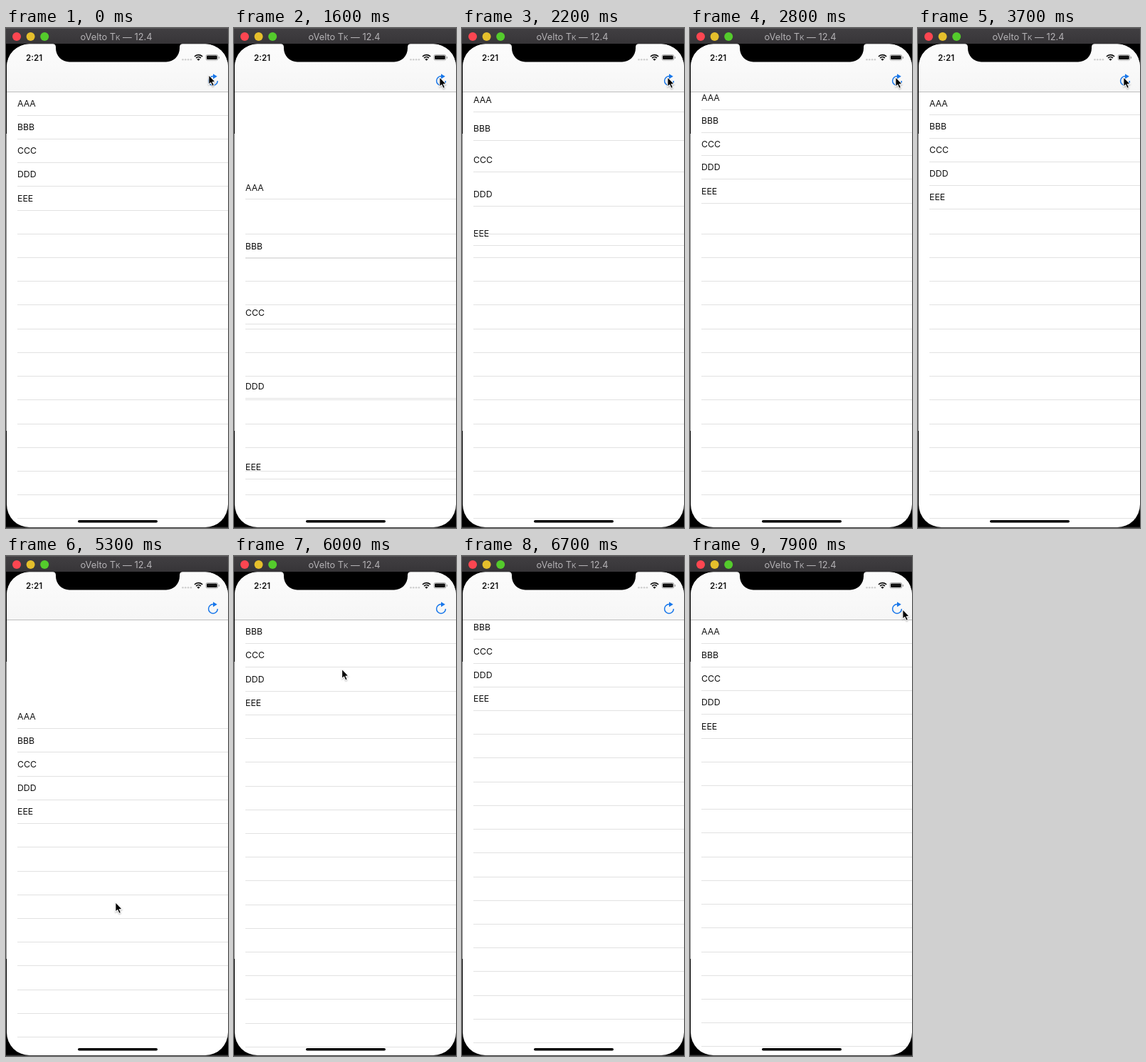
Recreate the animation shown at these times as an HTML page with a canvas. Size 312 by 700 pixels, loop 8 s.

```html
<!DOCTYPE html>
<html lang="en">
<head>
<meta charset="utf-8">
<title>List animation</title>
<style>
html, body { margin: 0; width: 100%; height: 100%; overflow: hidden; background: #000; }
canvas { display: block; width: 312px; height: 700px; }
</style>
</head>
<body>
<canvas id="stage"></canvas>
<script>
const W = 312, H = 700, LOOP = 8000;
const canvas = document.getElementById('stage');
const ctx = canvas.getContext('2d');
const dpr = window.devicePixelRatio || 1;
canvas.width = W * dpr;
canvas.height = H * dpr;

const FONT = 'Inter, Roboto, "Liberation Sans", sans-serif';
const NAMES = ['AAA', 'BBB', 'CCC', 'DDD', 'EEE'];
const TOP = 89, ROW = 33.22, SCREEN = 676;

// Reload: every row springs up from below, each a little later.
const RELOAD = 750, STAGGER = 100, OMEGA = 3.02, DAMPING = 0.8;
// Drag: the list follows the pointer, then bounces back.
const GRAB = 4850, RELEASE = 6400, GRAB_Y = 221, BOUNCE = 7.4;

// time, x, y
const PATH = [
  [100, 289, 69], [3750, 289, 69], [4450, 154, GRAB_Y], [GRAB, 154, GRAB_Y],
  [5300, 154, 485], [5400, 155, 489], [RELEASE, 150, -20],
  [7050, 300, -20], [7450, 296, 73], [7800, 299, 75], [LOOP, 299, 75]
];

function pointer(t) {
  if (t < 100) return [285, 66];
  const i = PATH.findIndex(p => p[0] > t);
  const [t0, x0, y0] = PATH[i - 1], [t1, x1, y1] = PATH[i];
  const u = (t - t0) / (t1 - t0), e = u * u * (3 - 2 * u);
  return [x0 + (x1 - x0) * e, y0 + (y1 - y0) * e];
}

function spring(sec) {
  if (sec <= 0) return 1;
  const s = sec * OMEGA, k = Math.sqrt(1 - DAMPING * DAMPING);
  return Math.exp(-DAMPING * s) * (Math.cos(k * s) + DAMPING / k * Math.sin(k * s));
}

function rubber(d) {
  return Math.sign(d) * SCREEN * (1 - 1 / (Math.abs(d) * 0.55 / SCREEN + 1));
}

function scroll(t) {
  if (t < GRAB) return 0;
  if (t < RELEASE) return rubber(pointer(t)[1] - GRAB_Y);
  const s = (t - RELEASE) / 1000 * BOUNCE;
  return rubber(pointer(RELEASE)[1] - GRAB_Y) * (1 + s) * Math.exp(-s);
}

function rowShift(i, t) {
  if (t < RELOAD || t >= GRAB) return 0;
  return SCREEN * spring((t - RELOAD - i * STAGGER) / 1000);
}

function rect(x, y, w, h, color) {
  ctx.fillStyle = color;
  ctx.fillRect(x, y, w, h);
}

function round(x, y, w, h, r, color) {
  ctx.beginPath();
  ctx.roundRect(x, y, w, h, r);
  ctx.fillStyle = color;
  ctx.fill();
}

function disc(x, y, r, color) {
  ctx.beginPath();
  ctx.arc(x, y, r, 0, Math.PI * 2);
  ctx.fillStyle = color;
  ctx.fill();
}

function poly(points, color) {
  ctx.beginPath();
  points.forEach(([x, y]) => ctx.lineTo(x, y));
  ctx.closePath();
  ctx.fillStyle = color;
  ctx.fill();
}

function text(str, x, y, size, color, weight = 400) {
  ctx.font = `${weight} ${size}px ${FONT}`;
  ctx.fillStyle = color;
  ctx.fillText(str, x, y);
  return x + ctx.measureText(str).width;
}

function list(t) {
  const shift = scroll(t);
  for (let i = 0; i < 24; i++) {
    const y = TOP + i * ROW + shift + (i < NAMES.length ? rowShift(i, t) : 0);
    if (y > H) continue;
    if (i < NAMES.length) text(NAMES[i], 16, y + 20.8, 12.3, '#111');
    rect(16, Math.round(y + ROW - 0.5), W - 16, 1, '#e2e2e2');
  }
}

function navBar() {
  const g = ctx.createLinearGradient(0, 23, 0, TOP);
  g.addColorStop(0, '#fcfcfc');
  g.addColorStop(1, '#f6f6f6');
  rect(0, 22, W, TOP - 22, g);
  rect(0, TOP, W, 1, '#bdbdbd');
}

function notch() {
  ctx.beginPath();
  ctx.moveTo(66, 22);
  ctx.quadraticCurveTo(70, 22.5, 70, 27);
  ctx.arcTo(70, 47.5, 90, 47.5, 19);
  ctx.arcTo(244, 47.5, 244, 27, 19);
  ctx.lineTo(244, 27);
  ctx.quadraticCurveTo(244, 22.5, 248, 22);
  ctx.closePath();
  ctx.fillStyle = '#000';
  ctx.fill();
}

function statusBar() {
  text('2:21', 28, 45.5, 11.6, '#111', 600);
  for (let i = 0; i < 4; i++) disc(248.5 + i * 3.8, 44.2, 1.3, '#cfcfcf');

  ctx.strokeStyle = '#111';
  ctx.lineWidth = 1.7;
  for (const r of [4.6, 7.6]) {
    ctx.beginPath();
    ctx.arc(270.5, 45.2, r, -Math.PI * 0.76, -Math.PI * 0.24);
    ctx.stroke();
  }
  ctx.beginPath();
  ctx.moveTo(270.5, 45.8);
  ctx.arc(270.5, 45.8, 2.8, -Math.PI * 0.76, -Math.PI * 0.24);
  ctx.fillStyle = '#111';
  ctx.fill();

  ctx.beginPath();
  ctx.roundRect(280.9, 37.4, 17, 7.8, 2.4);
  ctx.strokeStyle = '#999';
  ctx.lineWidth = 0.8;
  ctx.stroke();
  round(282, 38.5, 14.8, 5.6, 1.4, '#111');
  round(298.8, 40, 1.2, 2.8, 0.6, '#999');
}

function refreshIcon() {
  const blue = '#1877ea';
  ctx.beginPath();
  ctx.arc(291, 74, 6.4, -Math.PI / 2, 0, true);
  ctx.strokeStyle = blue;
  ctx.lineWidth = 1.5;
  ctx.stroke();
  poly([[291, 64.3], [296.8, 67.8], [291, 71.2]], blue);
}

function titleBar() {
  const g = ctx.createLinearGradient(0, 0, 0, 22);
  g.addColorStop(0, '#413f42');
  g.addColorStop(1, '#373538');
  rect(0, 0, W, 22, g);
  rect(0, 0, W, 1, '#565457');
  ['#fc4651', '#e5bf2c', '#54cb2c'].forEach((c, i) => disc(15 + i * 19.6, 12, 6, c));
  let x = text('oVelto T', 104.5, 16.6, 12.8, '#b4b2b5');
  x = text('K', x, 16.6, 9.6, '#b4b2b5');
  text(' — 12.4', x, 16.6, 12.8, '#b4b2b5');
}

function cursor([x, y]) {
  ctx.save();
  ctx.translate(x, y);
  ctx.shadowColor = 'rgba(0,0,0,0.3)';
  ctx.shadowBlur = 2 * dpr;
  ctx.shadowOffsetY = dpr;
  poly([[-0.6, -1], [-0.6, 14.2], [2.7, 11.4], [4.9, 16], [7.9, 14.7], [5.9, 10.3], [10.2, 10.1]], '#fff');
  ctx.shadowColor = 'transparent';
  poly([[0.4, 1.1], [0.4, 12], [3, 9.7], [5.3, 14.7], [6.8, 14], [4.5, 9.2], [8.1, 9]], '#000');
  ctx.restore();
}

function draw(t) {
  ctx.setTransform(dpr, 0, 0, dpr, 0, 0);
  rect(0, 0, W, H, '#000');
  rect(0, 698.6, W, 1.4, '#3a3a3a');
  rect(0, 148, 1, 416, '#8c8c8c');

  ctx.save();
  ctx.beginPath();
  ctx.roundRect(1, 22.5, 311, 676.5, 32);
  ctx.clip();
  rect(0, 22, W, H, '#fff');
  list(t);
  navBar();
  statusBar();
  refreshIcon();
  round(101, 689, 112, 3.6, 1.8, '#000');
  ctx.restore();

  notch();
  titleBar();
  cursor(pointer(t));
}

const start = performance.now();
function frame() {
  draw((performance.now() - start) % LOOP);
  requestAnimationFrame(frame);
}
frame();
</script>
</body>
</html>
```
